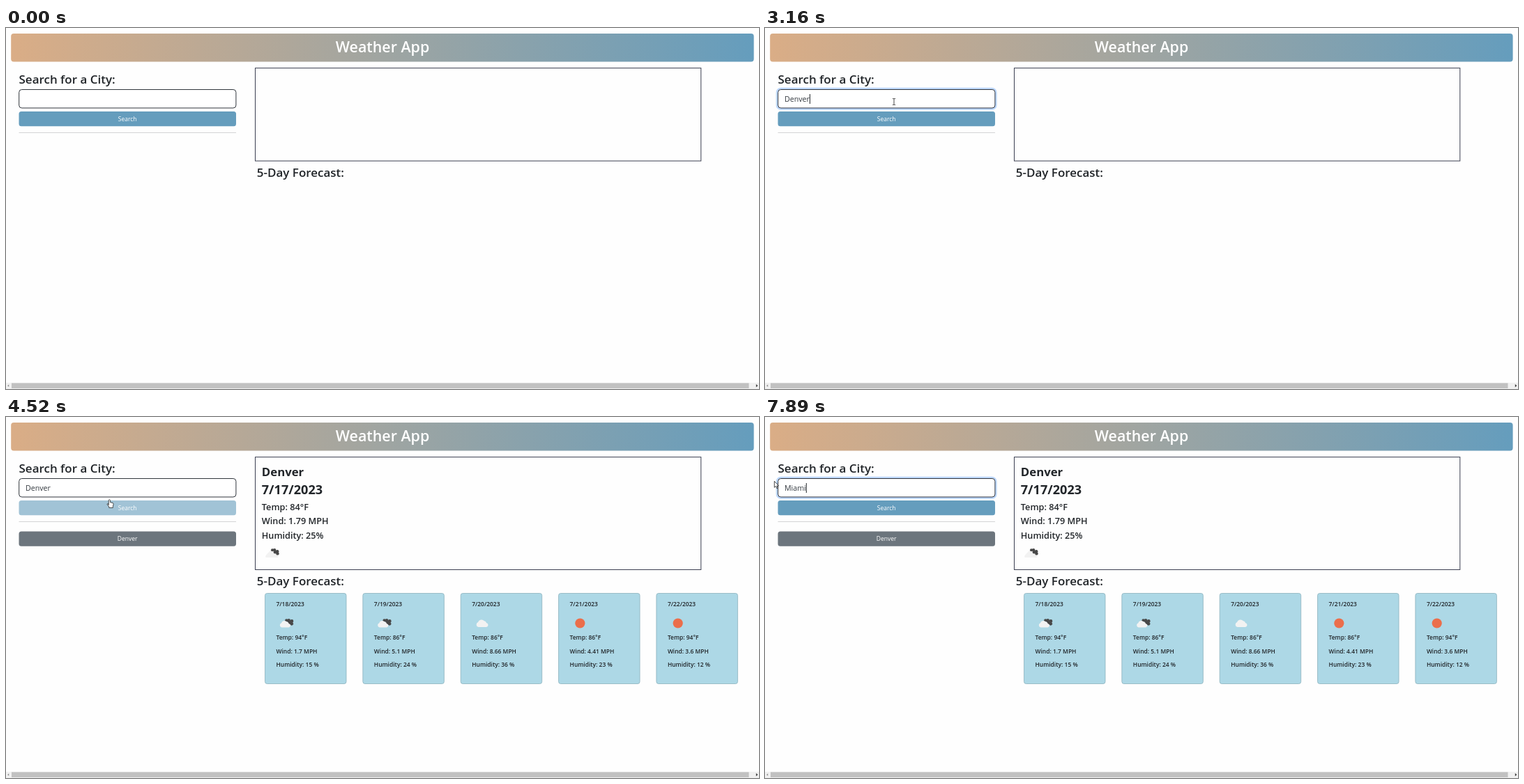
An HTML page that plays this animation: 1080 by 519 pixels, repeating every 8000 ms.

```html
<!DOCTYPE html>
<html lang="en">
<head>
<meta charset="utf-8">
<title>Weather App</title>
<style>
html, body { margin: 0; width: 100%; height: 100%; overflow: hidden; background: #fefefe; }
svg { display: block; width: 100%; height: 100%; font-family: "Open Sans", "Noto Sans", sans-serif; fill: #212529; }
text { white-space: pre; }
.semi { font-weight: 600; }
.bold { font-weight: 700; }
.mid { text-anchor: middle; }
.white { fill: #fff; }
</style>
</head>
<body>
<svg id="stage" viewBox="0 0 1080 519" preserveAspectRatio="none"></svg>
<script>
const LOOP = 8000;

const rect = (x, y, w, h, fill, rx = 0, more = '') =>
  `<rect x="${x}" y="${y}" width="${w}" height="${h}" rx="${rx}" fill="${fill}" ${more}/>`;
const label = (x, y, size, str, cls = '', more = '') =>
  `<text x="${x}" y="${y}" font-size="${size}" class="${cls}" ${more}>${str}</text>`;
const circles = (list, fill) =>
  `<g fill="${fill}">${list.map(([x, y, r]) => `<circle cx="${x}" cy="${y}" r="${r}"/>`).join('')}</g>`;

// Weather icons, centred on 0,0
const cloud = '<path fill="#f2f2f2" d="M-5.5 5.5A3.6 3.6 0 0 1-6-1.4A5.2 5.2 0 0 1 3-3.2A3.6 3.6 0 0 1 6-.6A3.1 3.1 0 0 1 6 5.5Z"/>';
const darkPuffs = circles([[0, -4, 2.2], [3.4, -4.2, 2.2], [4, -1, 2.6], [7.6, -3, 2.4], [7.4, .8, 2.4]], '#484848');
const icons = {
  broken: darkPuffs + `<g transform="translate(-2 1) scale(.9)">${cloud}</g>`,
  cloud,
  sun: '<circle r="7.1" fill="#eb6e4b"/>',
  today: '<path fill="#f2f2f2" d="M-8.5 6.5Q-10.5 5-8 2.5L-1.5-4.5L2-5L8 2.5Q10 5 8 6.5Z"/>' +
    circles([[.5, -4.2, 2], [3.6, -4.4, 2.2], [4.6, -1.4, 2.5], [7.6, -2.2, 2.3], [8, .9, 2.2]], '#484848')
};
const icon = (name, x, y) => `<g transform="translate(${x} ${y})">${icons[name]}</g>`;

const days = [
  ['7/18/2023', 'broken', 94, 1.7, 15],
  ['7/19/2023', 'broken', 86, 5.1, 24],
  ['7/20/2023', 'cloud', 86, 8.66, 36],
  ['7/21/2023', 'sun', 86, 4.41, 23],
  ['7/22/2023', 'sun', 94, 3.6, 12]
];
const card = ([date, sky, temp, wind, hum], i) => {
  const x = 371.5 + 140.35 * i;
  const line = (y, str) => label(x + 16, y, 8.45, str, 'semi');
  return rect(x, 253.5, 116.5, 130, '#add8e6', 3, 'stroke="#8cb1bd" stroke-width=".8"') +
    line(271.5, date) + icon(sky, x + 30.8, 296.5) +
    line(319.5, `Temp: ${temp}°F`) + line(339.5, `Wind: ${wind} MPH`) + line(359, `Humidity: ${hum} %`);
};

const cities = ['Dubai', 'Denver', 'Chicago', 'Miami', 'San Diego', 'Austin'];

document.getElementById('stage').innerHTML = `
<defs><linearGradient id="sky"><stop stop-color="#daad86"/><stop offset="1" stop-color="#659dbd"/></linearGradient></defs>
${rect(0, 0, 1080, 519, '#fefefe')}
${rect(7.2, 8, 1065.4, 40.4, 'url(#sky)', 4)}
${label(540, 35, 21.4, 'Weather App', 'semi mid white')}
${label(18.5, 80, 17, 'Search for a City:', 'semi')}
${rect(17.2, 87.2, 314, 29.2, 'none', 5.5, 'id="halo" stroke="#0d6efd" stroke-opacity=".27" stroke-width="2.8"')}
${rect(18.7, 88.5, 311.2, 26.5, '#fff', 4, 'stroke="#30353c" stroke-width="1"')}
${rect(28, 94, 0, 16.5, '#3390ff', 0, 'id="mark"')}
${label(28, 106, 10.65, '', '', 'id="typed"')}
${rect(0, 95, 1, 14, '#212529', 0, 'id="caret"')}
<g id="button">${rect(18.5, 120, 311.5, 21.2, '#659dbd', 3.5)}${label(174.2, 133.7, 8.5, 'Search', 'mid white')}</g>
${rect(18.5, 150, 311.5, .9, '#cfd0d1')}
<g id="history">${rect(18.5, 164.5, 311.5, 21.3, '#6c757d', 3.5)}${label(174.2, 178.2, 8.5, 'Denver', 'mid white')}</g>
${rect(357.5, 57.6, 639.3, 133.5, 'none', 0, 'id="box" stroke="#3b3f51" stroke-width="1"')}
<g id="result">
${label(366.8, 85, 16.8, 'Denver', 'bold')}
${label(366.8, 111, 18.1, '7/17/2023', 'bold')}
${label(366.8, 133.5, 12.7, 'Temp: 84°F', 'semi')}
${label(366.8, 154, 12.7, 'Wind: 1.79 MPH', 'semi')}
${label(366.8, 174.5, 12.7, 'Humidity: 25%', 'semi')}
</g>
${label(359.8, 0, 17, '5-Day Forecast:', 'semi', 'id="heading"')}
<g id="forecast">${icon('today', 381.5, 195.5)}${days.map(card).join('')}</g>
<g id="popup">
<path d="M80 121.5L86 116.5L92 121.5Z" fill="#292a2d"/>
${rect(74.5, 121, 40.5, 25, '#292a2d', 2, 'id="panel"')}
${cities.map((c, i) => label(81, 136 + 20.6 * i, 7.05, c, 'white')).join('')}
</g>
${rect(0, 510, 1080, 9, '#f1f1f1')}
${rect(8, 510.5, 1057.5, 7.5, '#c1c1c1')}
<path d="M4.2 512.5V516L2.2 514.2Z" fill="#8b8b8b"/><path d="M1075.8 512V516.4L1078.4 514.2Z" fill="#404040"/>
<g id="pointer">
<path id="arrow" d="M.4.3V9.3L2.5 7.4L4 10.8L5.4 10.2L4 6.9H6.7Z" fill="#fff" stroke="#222" stroke-width=".8"/>
<path id="beam" d="M-2-4.5H-.6L0-4L.6-4.5H2M0-4V4M-2 4.5H-.6L0 4L.6 4.5H2" fill="none" stroke="#333" stroke-width=".9"/>
<path id="hand" d="M-1.1 8.3V1Q0-.4 1.1 1V4.3Q2-.1+3.7 3 4.7L4.7 5.1Q6 5.5 5.7 7.3L5 10.2V12H-.6V10.6L-3.2 7.2Q-3.2 5.9-2 6.3Z" fill="#fff" stroke="#222" stroke-width=".8" stroke-linejoin="round"/>
</g>`;

const el = {};
document.querySelectorAll('#stage [id]').forEach(e => el[e.id] = e);
el.hand.setAttribute('d', 'M-1.1 8V1Q0-.4 1.1 1V4.2L4.6 5Q6 5.4 5.7 7.3L5 10.2V12H-.6V10.6L-3.2 7.2Q-3.2 5.9-2 6.3Z');
const set = (e, attrs) => { for (const k in attrs) e.setAttribute(k, attrs[k]); };
const show = (e, on) => set(e, { opacity: +on });
const ramp = (t, a, b) => Math.min(1, Math.max(0, (t - a) / (b - a)));

// start, end, steps, x, y, easing power
const moves = [
  [70, 690, 10, 168, 103, 2],
  [760, 760, 1, 178, 100, 1],
  [3160, 3160, 1, 185, 106, 1],
  [3230, 3440, 4, 183, 129, 1],
  [4520, 5010, 8, 78, 97, 3],
  [5480, 5900, 7, 3, 95, 1],
  [5970, 6040, 2, 13, 92, 1]
];
function pointerAt(t) {
  let x = 1080, y = 521;
  for (const [a, b, n, mx, my, pow] of moves) {
    if (t < a) break;
    const step = t >= b ? n : Math.floor((t - a) / (b - a) * (n - 1)) + 1;
    const p = 1 - (1 - step / n) ** pow;
    x += (mx - x) * p;
    y += (my - y) * p;
  }
  return [x, y];
}

const keys = [
  [1030, ''], [1490, 'D'], [2150, 'De'], [2280, 'Den'], [2420, 'Denv'], [2560, 'Denve'], [2700, 'Denver'],
  [6770, ''], [7170, 'M'], [7430, 'Mi'], [7630, 'Mia'], [7760, 'Miam'], [7890, 'Miami']
];

function draw(t) {
  const [x, y] = pointerAt(t);
  const inField = x > 18 && x < 330 && y > 88 && y < 116;
  const onButton = x > 18 && x < 330 && y > 118 && y < 142 && t > 3160;
  set(el.pointer, { transform: `translate(${x} ${y})`, opacity: +(t >= 70) });
  show(el.beam, inField);
  show(el.hand, onButton);
  show(el.arrow, !inField && !onButton);

  const [keyTime, str] = keys.filter(k => k[0] <= t).pop() || [0, ''];
  el.typed.textContent = str;
  const width = str ? el.typed.getComputedTextLength() : 0;
  const selecting = t >= 5480 && t < 6770;
  const markX = selecting ? Math.min(28 + width, Math.max(28, x)) : 28 + width;
  set(el.mark, { x: markX, width: 28 + width - markX });
  set(el.typed, { fill: selecting && markX < 30 ? '#fff' : '#343a40' });

  const focused = t >= 1030 && t < 3580 || t >= 5480;
  const blinkOn = (t - keyTime) % 1060 < 530;
  set(el.caret, { x: 28 + width });
  show(el.caret, focused && blinkOn && !(selecting && markX < 28 + width));
  show(el.halo, ramp(t, 1000, 1230) - ramp(t, 3550, 3720) + ramp(t, 5450, 5620));
  show(el.button, 1 - .4 * (ramp(t, 3260, 3440) - ramp(t, 4570, 4740)));

  const full = t < 1490;
  set(el.panel, { width: full ? 54.5 : 40.5, height: full ? 128 : 25 });
  [...el.popup.querySelectorAll('text')].forEach((e, i) => show(e, full || i === 0));
  show(el.popup, ramp(t, 1030, 1200) - ramp(t, 2130, 2280));

  const loaded = t >= 3720, done = t >= 3860;
  const grow = done ? 28.4 : loaded ? 26 : 0;
  show(el.history, loaded);
  show(el.result, loaded);
  show(el.forecast, done);
  set(el.box, { height: 133.5 + grow });
  set(el.heading, { y: 213.7 + grow });
}

function tick() {
  draw(performance.now() % LOOP);
  requestAnimationFrame(tick);
}
tick();
</script>
</body>
</html>
```
